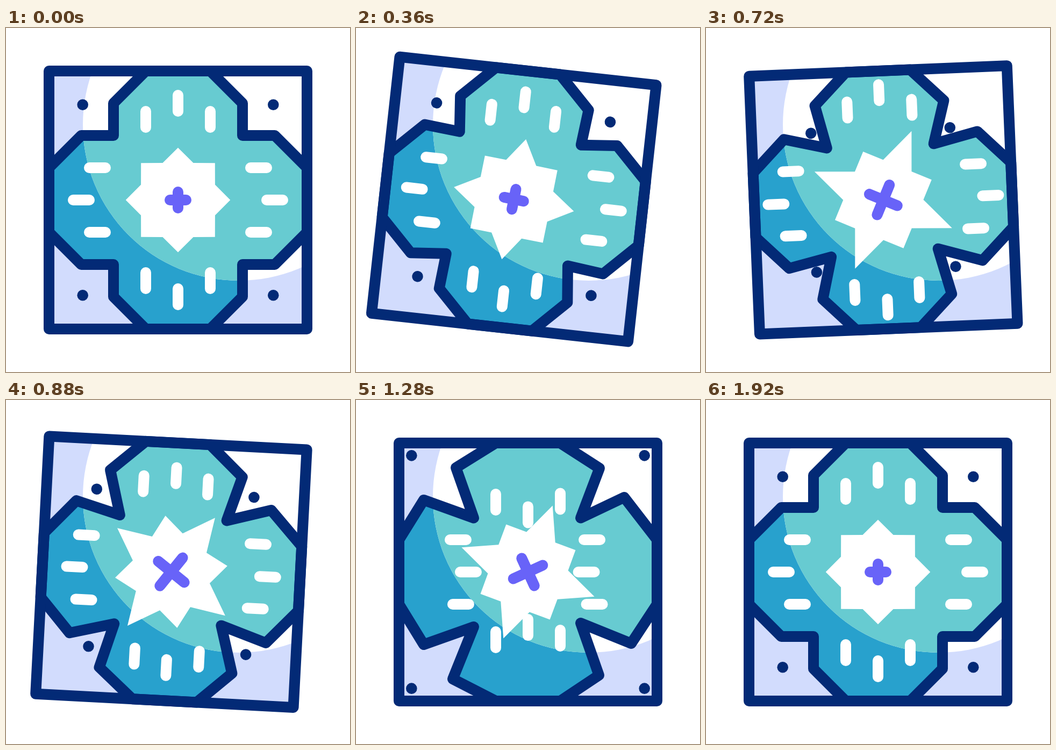
These frames come from a looping animation (640x640 px, 2 s). An HTML page with a canvas:

```html
<!DOCTYPE html>
<html lang="en">
<head>
<meta charset="utf-8">
<title>Swinging tile</title>
<style>
html, body { margin: 0; width: 100%; height: 100%; overflow: hidden; background: #fff; }
canvas { display: block; width: 100vmin; height: 100vmin; }
</style>
</head>
<body>
<canvas id="stage" width="640" height="640"></canvas>
<script>
const ctx = document.getElementById('stage').getContext('2d');
const LOOP = 2000, STEP = 40, MID = 320, RAD = Math.PI / 180;
const NAVY = '#032a76', WHITE = '#fff', PURPLE = '#6863f8';

// Smooth 0..1 between two times
const ramp = (t, from, to) => {
  const u = Math.min(1, Math.max(0, (t - from) / (to - from)));
  return u * u * (3 - 2 * u);
};

// Tile swing: [time, degrees]
const swing = [[100, 0], [320, 7], [600, -6], [875, 3], [1175, 0]];
const swingAt = t => swing.slice(1).reduce((angle, [time, deg], i) =>
  angle + (deg - swing[i][1]) * ramp(t, swing[i][0], time), 0);

// Corners of the flower: [sign x, sign y, side shoulder, notch, end shoulder shifts]
const corners = [
  [1, -1, [13, -13], [-22, 19.5], [-1, -19]],
  [1, 1, [12, 12], [-22, -25], [12, 13]],
  [-1, 1, [-20, 19], [19, -18], [-14, 15]],
  [-1, -1, [-14, -14], [19, 19.5], [-14, -14]]
];

// Dashes per side (top, right, bottom, left): how far each one travels inward
const travel = [[20, 73.5, 18.5], [31, 71.5, 26.5], [27, 77, 24], [25, 69, 20]];

function trace(points) {
  ctx.beginPath();
  points.forEach(p => ctx.lineTo(p[0], p[1]));
  ctx.closePath();
}

function bar(x1, y1, x2, y2, color) {
  ctx.strokeStyle = color;
  ctx.beginPath();
  ctx.moveTo(x1, y1);
  ctx.lineTo(x2, y2);
  ctx.stroke();
}

function flower(notch, shoulder) {
  const points = [];
  corners.forEach(([sx, sy, a, n, b]) => {
    const part = [
      [60 * sx, 240 * sy],
      [120 * sx + a[0] * shoulder, 180 * sy + a[1] * shoulder],
      [120 * sx + n[0] * notch, 120 * sy + n[1] * notch],
      [180 * sx + b[0] * shoulder, 120 * sy + b[1] * shoulder],
      [240 * sx, 60 * sy]
    ];
    points.push(...(sx * sy < 0 ? part : part.reverse()));
  });
  return points;
}

function place(angle) {
  ctx.translate(MID, 80);
  ctx.rotate(angle);
  ctx.translate(0, 240);
}

function fills(angle, shape, ground, petal) {
  ctx.save();
  place(angle);
  ctx.fillStyle = ground;
  ctx.fillRect(-240, -240, 480, 480);
  ctx.fillStyle = petal;
  trace(shape);
  ctx.fill();
  ctx.restore();
}

function draw(t) {
  const grow = ramp(t, 160, 700), turn = ramp(t, 700, 1290), back = ramp(t, 1340, 1900);
  const angle = swingAt(t) * RAD;
  const shape = flower(grow - back, turn - back);

  ctx.fillStyle = WHITE;
  ctx.fillRect(0, 0, 640, 640);
  fills(angle, shape, '#d2dcfd', '#28a1cd');
  ctx.save();
  ctx.beginPath();
  ctx.arc(433, 180, 290, 0, 7);
  ctx.clip();
  fills(angle, shape, WHITE, '#67cbd1');
  ctx.restore();

  ctx.save();
  place(angle);
  ctx.lineWidth = 20;
  ctx.lineCap = ctx.lineJoin = 'round';
  ctx.strokeStyle = NAVY;
  trace(shape);
  ctx.stroke();
  ctx.strokeRect(-240, -240, 480, 480);

  const dot = 177.3 - 48 * grow + 88 * ramp(t, 710, 1310) - 40 * back;
  ctx.fillStyle = NAVY;
  corners.forEach(([sx, sy]) => {
    ctx.beginPath();
    ctx.arc(dot * sx, dot * sy, 10.3, 0, 7);
    ctx.fill();
  });

  travel.forEach((side, i) => {
    ctx.save();
    ctx.rotate(i * Math.PI / 2);
    side.forEach((inward, j) => {
      const x = (j - 1) * 60;
      const y = (j === 1 ? -180 : -150) - 20 * grow + (inward + 20) * turn - inward * back;
      bar(x, y - 15, x, y + 15, WHITE);
    });
    ctx.restore();
  });

  // Star and cross make a quarter turn
  ctx.rotate(ramp(t, 100, 1900) * Math.PI / 2);
  const tips = 97.3 + 41.2 * (ramp(t, 100, 700) - turn);
  const between = 97.3 + 34.5 * (turn - back);
  const radii = [tips, 74.6, between, 74.6];
  ctx.fillStyle = WHITE;
  trace(Array.from({ length: 16 }, (_, i) => {
    const a = i * Math.PI / 8, r = radii[i % 4];
    return [r * Math.sin(a), -r * Math.cos(a)];
  }));
  ctx.fill();

  const stretch = ramp(t, 100, 1000) - ramp(t, 1000, 1900);
  const tall = 15 + 19.5 * stretch, wide = 15 + 17 * stretch;
  bar(0, -tall, 0, tall, PURPLE);
  bar(-wide, 0, wide, 0, PURPLE);
  ctx.restore();
}

const start = performance.now();
function tick() {
  const t = (performance.now() - start) % LOOP;
  draw(Math.floor(t / STEP) * STEP);
  requestAnimationFrame(tick);
}
tick();
</script>
</body>
</html>
```
